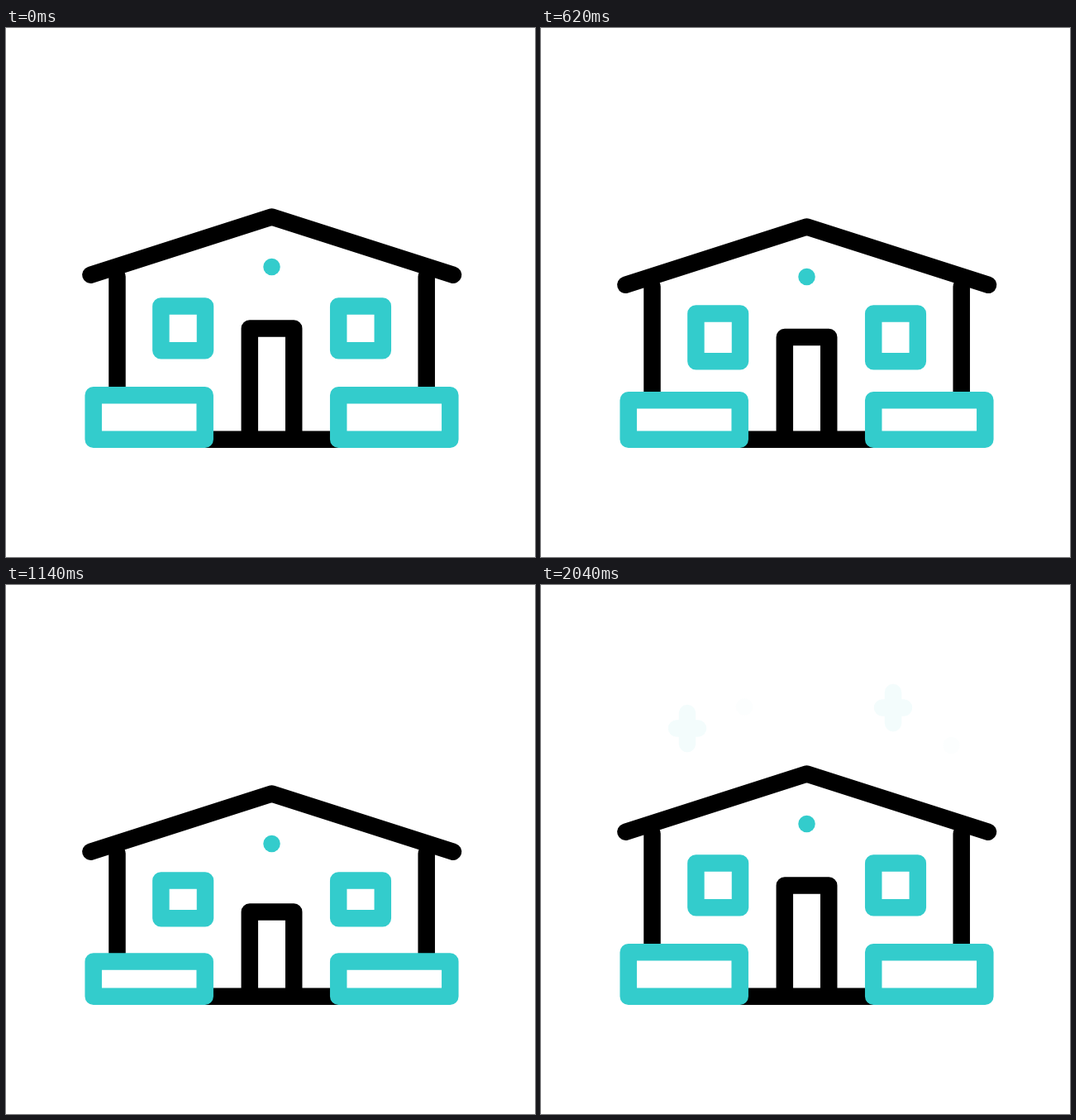
An HTML page with a canvas that plays this animation: 640x640 px, repeating every 2.42 s.

```html
<!DOCTYPE html>
<html lang="en">
<head>
<meta charset="utf-8">
<title>House</title>
<style>
html, body { margin: 0; width: 100%; height: 100%; overflow: hidden; background: #fff; }
canvas { display: block; width: 640px; height: 640px; }
</style>
</head>
<body>
<canvas id="stage" width="640" height="640"></canvas>
<script>
const ctx = document.getElementById('stage').getContext('2d');
const LOOP = 2420, STEP = 20, STROKE = 20.5, R = STROKE / 2;
const BLACK = '#000', TEAL = '#33cccc', WHITE = '#fff';

const smooth = x => x * x * (3 - 2 * x);
const easeOut = x => x * (2 - x);

// keys: [time, value, time, value, ...]
function track(t, keys, ease = smooth) {
  if (t <= keys[0]) return keys[1];
  for (let i = 2; i < keys.length; i += 2) {
    if (t < keys[i]) {
      const [t0, v0, t1, v1] = keys.slice(i - 2, i + 2);
      return v0 + (v1 - v0) * ease((t - t0) / (t1 - t0));
    }
  }
  return keys[keys.length - 1];
}

function line(points, color) {
  ctx.strokeStyle = color;
  ctx.beginPath();
  points.forEach(([x, y]) => ctx.lineTo(x, y));
  ctx.stroke();
}

function box(left, top, right, bottom) {
  ctx.fillStyle = WHITE;
  ctx.strokeStyle = TEAL;
  ctx.beginPath();
  ctx.rect(left, top, right - left, bottom - top);
  ctx.fill();
  ctx.stroke();
}

function dot(x, y, color) {
  ctx.fillStyle = color;
  ctx.beginPath();
  ctx.arc(x, y, R, 0, Math.PI * 2);
  ctx.fill();
}

function sparkle(x, y, h, v, color) {
  ctx.strokeStyle = color;
  ctx.beginPath();
  ctx.moveTo(x - h, y);
  ctx.lineTo(x + h, y);
  ctx.moveTo(x, y - v);
  ctx.lineTo(x, y + v);
  ctx.stroke();
}

function drawSky(t) {
  if (t < 1160) return;
  const tint = track(t, [1480, 0, 1760, 1]);
  const color = `rgb(${51 * tint}, ${204 * tint}, ${204 * tint})`;
  const h = track(t, [1160, 0, 1420, 8.5, 1840, 23, 2040, 13]);
  const v = track(t, [1160, 0, 1420, 7, 1840, 22, 2040, 18.5]);

  ctx.globalAlpha = track(t, [1780, 1, 2040, 0.055]);
  sparkle(177, track(t, [1160, 310, 1670, 173.5], easeOut), h, v, color);
  sparkle(426, track(t, [1160, 300, 1600, 148.5], easeOut), h, v, color);

  ctx.globalAlpha = track(t, [1780, 1, 2040, 0.015]);
  dot(246, track(t, [1160, 295, 1400, 147.5], easeOut), color);
  if (t > 1420) dot(496.5, track(t, [1420, 302, 1860, 194], easeOut), color);
  ctx.globalAlpha = 1;
}

function drawHouse(t) {
  const bounce = (down, up, last = down) =>
    track(t, [260, 0, 500, down, 920, up, 1140, last, 1380, 0]);
  const roof = bounce(24, -36);
  const sill = track(t, [260, 0, 480, 13, 1140, 13, 1380, 0]);
  const pane = bounce(21, -39);
  const door = 363.6 + bounce(20, -28, 32);
  const hedge = 444.2 + track(t, [0, 0, 500, 11.5, 920, -16, 1200, 15, 1640, 0]);
  const eaves = 298.7 + roof, ground = 497.8;

  // White walls hide whatever rises from behind the roof
  ctx.fillStyle = WHITE;
  ctx.beginPath();
  [[134.5, ground], [134.5, eaves - 10], [321.5, 228.5 + roof], [508.7, eaves - 10], [508.7, ground]]
    .forEach(([x, y]) => ctx.lineTo(x, y));
  ctx.fill();

  line([[134.5, eaves + 2], [134.5, ground], [508.7, ground], [508.7, eaves + 2]], BLACK);
  line([[102.4, eaves], [321.5, 228.5 + roof], [541, eaves]], BLACK);
  line([[294.8, ground], [294.8, door], [348.2, door], [348.2, ground]], BLACK);
  dot(321.5, 289 + roof, TEAL);

  box(187.4, 336.5 + pane, 241, 390.2 + sill);
  box(402.2, 336.5 + pane, 455.8, 390.2 + sill);
  box(105.7, hedge, 240.7, ground);
  box(402.2, hedge, 537.3, ground);
}

function frame(now) {
  const t = Math.floor((now % LOOP) / STEP) * STEP;
  ctx.fillStyle = WHITE;
  ctx.fillRect(0, 0, 640, 640);
  ctx.lineWidth = STROKE;
  ctx.lineCap = ctx.lineJoin = 'round';
  drawSky(t);
  drawHouse(t);
}

const start = performance.now();
function tick() {
  frame(performance.now() - start);
  requestAnimationFrame(tick);
}
tick();
</script>
</body>
</html>
```
